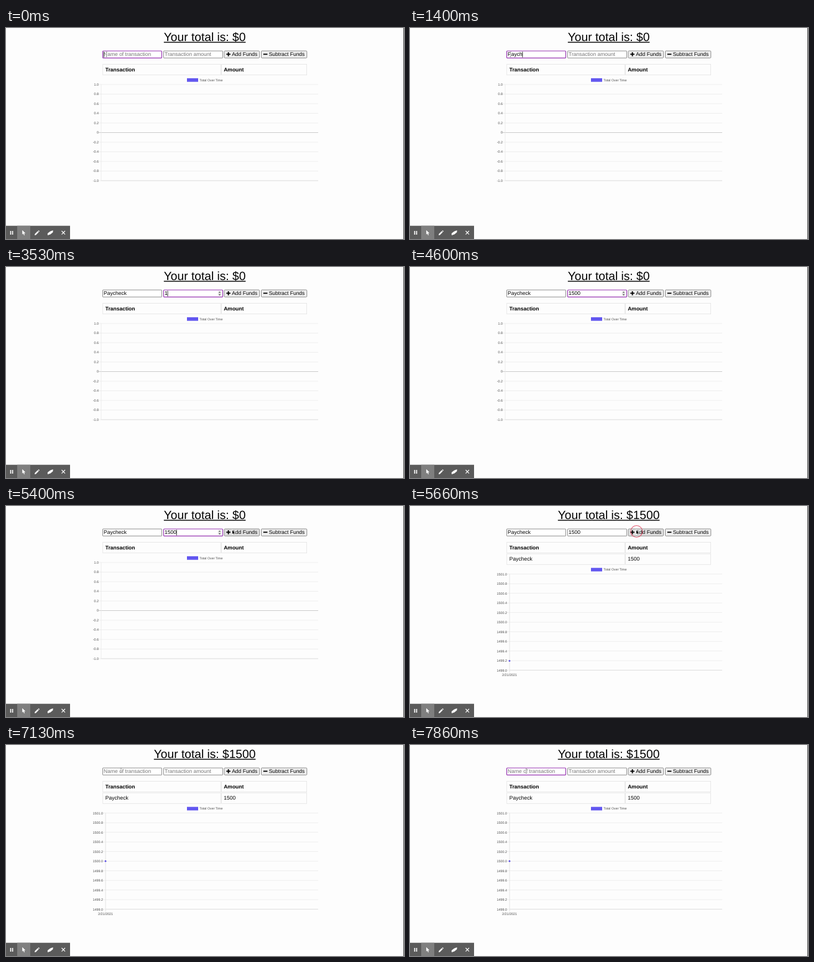
An HTML page with a canvas that plays this animation: 640 px wide and 340 px high, repeating every 8000 ms.

```html
<!DOCTYPE html>
<html lang="en">
<head>
<meta charset="utf-8">
<title>Budget tracker</title>
<style>
html, body { margin: 0; width: 100%; height: 100%; overflow: hidden; background: #fdfdfd; }
canvas { display: block; width: 640px; height: 340px; }
</style>
</head>
<body>
<canvas id="stage"></canvas>
<script>
const W = 640, H = 340, LOOP = 8000;
const canvas = document.getElementById('stage');
const ctx = canvas.getContext('2d');
const dpr = window.devicePixelRatio || 1;
canvas.width = W * dpr;
canvas.height = H * dpr;

const FONT = '"Liberation Sans", Arial, sans-serif';
const NAME_KEYS = [800, 1000, 1130, 1260, 1400, 1530, 1660, 1800];
const AMOUNT_KEYS = [3530, 3800, 3930, 4060];
const TAB = 2600, PRESS = 5530, ADDED = 5608, CLEARED = 5730, REFOCUS = 7330;
const NAME_CARET = [[0, 60], [660, 2330], [REFOCUS, 7860]];
const AMOUNT_CARET = [[TAB, 3130], [3530, 4600], [5130, PRESS]];

const NAME_BOX = { x: 155.5, y: 37, w: 95, h: 11.3 };
const AMOUNT_BOX = { x: 253.5, y: 37, w: 95, h: 11.3 };
const ADD_BOX = { x: 351, y: 36.9, w: 56.5, h: 11.4 };
const SUB_BOX = { x: 410.5, y: 36.9, w: 73.3, h: 11.4 };

const mix = (a, b, p) => a + (b - a) * p;
const clamp = v => Math.max(0, Math.min(1, v));
const ease = p => p * p * (3 - 2 * p);
const during = (spans, t) => spans.some(([a, b]) => t >= a && t < b);
const typed = (word, keys, t) => word.slice(0, keys.filter(k => t >= k).length);
const inside = (m, b) => m && m.x >= b.x && m.x <= b.x + b.w && m.y >= b.y && m.y <= b.y + b.h;

function text(str, x, y, size, { color = '#000', align = 'left', weight = '' } = {}) {
  ctx.font = `${weight} ${size}px ${FONT}`;
  ctx.textAlign = align;
  ctx.fillStyle = color;
  ctx.fillText(str, x, y);
}

function rect(x, y, w, h, color) {
  ctx.fillStyle = color;
  ctx.fillRect(x, y, w, h);
}

function path(points, { fill, stroke, width = 1, close = false }) {
  ctx.beginPath();
  points.forEach(([x, y]) => ctx.lineTo(x, y));
  if (close) ctx.closePath();
  if (stroke) { ctx.strokeStyle = stroke; ctx.lineWidth = width; ctx.stroke(); }
  if (fill) { ctx.fillStyle = fill; ctx.fill(); }
}

function box(b, fill, stroke, width, radius) {
  ctx.beginPath();
  ctx.roundRect(b.x, b.y, b.w, b.h, radius);
  ctx.fillStyle = fill;
  ctx.fill();
  ctx.strokeStyle = stroke;
  ctx.lineWidth = width;
  ctx.stroke();
}

function mouseAt(t) {
  if (t < 1800) return { x: 161.7, y: 42.5 };
  if (t < 4630) return null;
  if (t < 6330) {
    const p = ease(clamp((t - 4630) / 770));
    return { x: mix(161.7, 364, p), y: mix(42.5, 38.9, p) - 30 * Math.sin(Math.PI * p) };
  }
  const p = ease(clamp((t - 6330) / 400));
  const q = ease(clamp((t - 7130) / 130));
  return { x: mix(364, 185, p) + 2 * q, y: mix(38.9, 41, p) + q };
}

function drawTitle(total) {
  const label = 'Your total is: $' + total;
  text(label, 319.6, 20.8, 19.2, { align: 'center' });
  const w = ctx.measureText(label).width;
  rect(319.6 - w / 2, 22.3, w, 1.4, '#000');
}

function drawField(b, value, hint, focused, caret) {
  box(b, '#fff', focused ? '#9a3bb4' : '#767676', focused ? 1.2 : 0.8, focused ? 1 : 0.5);
  const x = b.x + 1.6;
  text(value || hint, x, 45.4, 8.5, { color: value ? '#000' : '#757575' });
  if (caret) rect(x + (value ? ctx.measureText(value).width : 0) - 0.2, 38.2, 0.8, 9.2, '#000');
}

function drawSpinner() {
  rect(340.5, 38.2, 6, 9, '#efefef');
  path([[341.7, 41.6], [343.5, 39.5], [345.3, 41.6]], { fill: '#555' });
  path([[341.7, 43.8], [343.5, 45.9], [345.3, 43.8]], { fill: '#555' });
}

function drawButton(b, label, plus, hover) {
  box(b, hover ? '#e0e0e0' : '#efefef', '#767676', 0.8, 1.2);
  const x = b.x + 3.3;
  rect(x, 41.4, 6.6, 1.8, '#000');
  if (plus) rect(x + 2.4, 39, 1.8, 6.6, '#000');
  text(label, b.x + 12.2, 45.4, 8.5);
}

function drawRow(y, left, right, weight) {
  ctx.strokeStyle = '#e4e4e4';
  ctx.lineWidth = 0.8;
  ctx.strokeRect(155.7, y, 189.6, 17.2);
  ctx.strokeRect(346.6, y, 137, 17.2);
  text(left, 159.8, y + 11.3, 8.5, { weight });
  text(right, 350.2, y + 11.3, 8.5, { weight });
}

function drawChart(t, added) {
  const shift = added ? 18.7 : 0;
  const axis = added ? 160 : 153;
  const top = 91 + shift, step = 15.5, bottom = top + 10 * step;
  const gray = { color: '#4c4c4c' };
  rect(291, 81 + shift, 18, 5.7, '#6257f0');
  text('Total Over Time', 311.3, 85.7 + shift, 5.3, gray);

  for (let i = 0; i <= 10; i++) {
    const y = top + i * step;
    const value = (5 - i) / 5;
    const zero = !added && i === 5;
    rect(axis - 4, y - 0.4, 502 - axis + 4, 0.8, zero ? '#c2c2c2' : '#ebebeb');
    const label = zero ? '0' : (value + (added ? 1500 : 0)).toFixed(1);
    text(label, axis - 4, y + 1.8, 5.4, { ...gray, align: 'right' });
  }
  rect(axis - 0.3, top, 0.7, bottom - top + (added ? 4 : 0), added ? '#d9d9d9' : '#e8e8e8');
  rect(axis, bottom - 0.4, 502 - axis, 0.8, '#dcdcdc');

  if (!added) return;
  text('2/21/2021', axis, bottom + 9.2, 5.4, { ...gray, align: 'center' });
  const rise = 1 - Math.pow(1 - clamp((t - ADDED) / 1000), 4);
  ctx.beginPath();
  ctx.arc(axis, mix(bottom, top + 5 * step, rise), 1.4, 0, 2 * Math.PI);
  ctx.fillStyle = '#5c50e4';
  ctx.fill();
}

function drawToolbar() {
  rect(0, 318.7, 103, 21.3, '#5b5b5b');
  rect(18, 318.7, 21, 21.3, '#7f7f7f');
  const white = '#fff';
  rect(6.7, 327, 1.6, 6, white);
  rect(9.8, 327, 1.6, 6, white);
  path([[26.2, 325.8], [26.2, 332.7], [27.8, 331.3], [29, 334], [30.2, 333.4],
    [29, 330.9], [31.2, 330.7]], { fill: white, close: true });
  path([[46, 334], [46.5, 331.8], [51, 327.3], [52.7, 329], [48.2, 333.5]], { fill: white, close: true });
  path([[51.6, 326.7], [52.4, 325.9], [54.1, 327.6], [53.3, 328.4]], { fill: white, close: true });
  path([[66.8, 331], [71, 327.8], [75.6, 326], [75.4, 329.3], [71.4, 332.4], [67, 334]],
    { fill: white, close: true });
  path([[89.5, 327], [95, 332.6]], { stroke: white, width: 1.1 });
  path([[95, 327], [89.5, 332.6]], { stroke: white, width: 1.1 });
}

function drawRing(t, start, x, y) {
  const p = (t - start) / 230;
  if (p < 0 || p >= 1) return;
  ctx.beginPath();
  ctx.arc(x, y, mix(3.5, 14, p), 0, 2 * Math.PI);
  ctx.strokeStyle = `rgba(222, 45, 75, ${0.95 - 0.6 * p * p})`;
  ctx.lineWidth = 1.1;
  ctx.stroke();
}

function drawMouse({ x, y }, beam) {
  if (beam) {
    rect(x - 0.9, y - 4, 1.8, 8, 'rgba(255,255,255,0.85)');
    rect(x - 0.3, y - 3.6, 0.6, 7.2, '#777');
    rect(x - 1.3, y - 4, 2.6, 0.6, '#777');
    rect(x - 1.3, y + 3.4, 2.6, 0.6, '#777');
    return;
  }
  const tip = [[0, 0], [0, 6], [1.4, 4.8], [2.3, 6.8], [3.2, 6.4], [2.4, 4.5], [4.2, 4.4]];
  path(tip.map(([dx, dy]) => [x + dx, y + dy]), { fill: '#000', stroke: '#fff', width: 1.4, close: true });
}

function render(t) {
  ctx.setTransform(dpr, 0, 0, dpr, 0, 0);
  ctx.textRendering = 'geometricPrecision';
  rect(0, 0, W, H, '#fdfdfd');

  const added = t >= ADDED, cleared = t >= CLEARED;
  const mouse = mouseAt(t);
  const overName = inside(mouse, NAME_BOX), overAmount = inside(mouse, AMOUNT_BOX);
  const amountFocus = t >= TAB && t < PRESS;

  drawTitle(added ? 1500 : 0);
  drawField(NAME_BOX, cleared ? '' : typed('Paycheck', NAME_KEYS, t), 'Name of transaction',
    t < TAB || t >= REFOCUS, during(NAME_CARET, t));
  drawField(AMOUNT_BOX, cleared ? '' : typed('1500', AMOUNT_KEYS, t), 'Transaction amount',
    amountFocus, during(AMOUNT_CARET, t));
  if (amountFocus || overAmount) drawSpinner();
  drawButton(ADD_BOX, 'Add Funds', true, inside(mouse, ADD_BOX));
  drawButton(SUB_BOX, 'Subtract Funds', false, false);

  drawRow(58.5, 'Transaction', 'Amount', 'bold');
  if (added) drawRow(77.1, 'Paycheck', '1500', '');
  drawChart(t, added);

  drawToolbar();
  rect(639, 0, 1, H, '#4a4a4a');
  drawRing(t, PRESS, 364.3, 41);
  drawRing(t, REFOCUS - 30, 187, 42);
  if (mouse) drawMouse(mouse, overName || overAmount);
}

function tick() {
  render(performance.now() % LOOP);
  requestAnimationFrame(tick);
}
tick();
</script>
</body>
</html>
```
